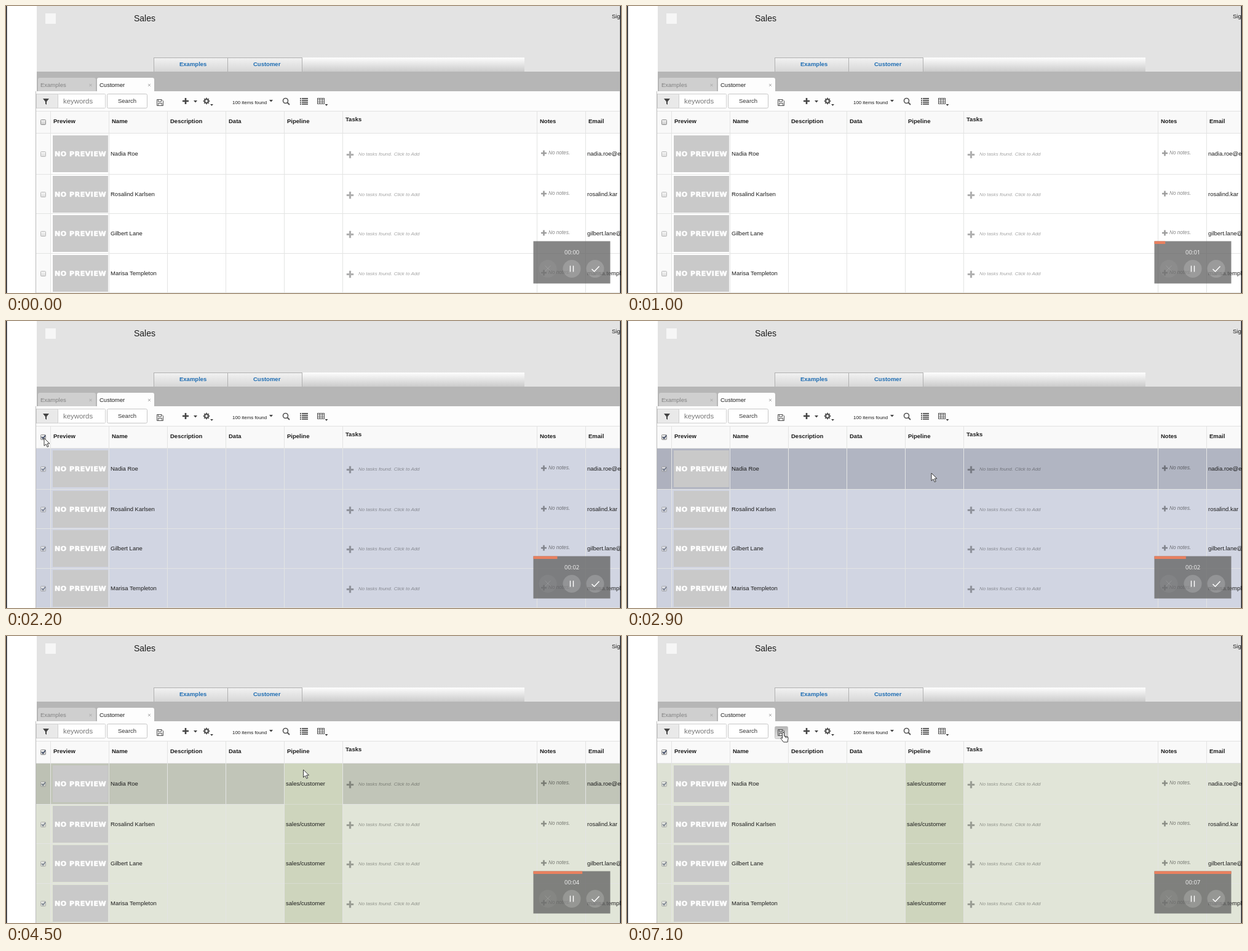
An HTML page for the animation above (7200 ms loop, 1000x468 px).

```html
<!DOCTYPE html>
<html lang="en">
<head>
<meta charset="utf-8">
<title>Customer table</title>
<style>
html, body { margin: 0; width: 100%; height: 100%; overflow: hidden; background: #fff; }
svg { display: block; width: 100%; height: 100%; font: 9.5px "Liberation Sans", Arial, sans-serif; fill: #1c1c1c; }
.bold { font-weight: bold; }
.small { font-size: 7.9px; }
.hint { font-size: 7.9px; font-style: italic; fill: #000; fill-opacity: .36; }
.none { font: bold 11px "DejaVu Sans", sans-serif; letter-spacing: .55px; fill: #fff; stroke: #fff; stroke-width: .6; }
.time { font: 9.5px "Open Sans", sans-serif; fill: #f4f4f4; }
.line { fill: none; stroke: #555; }
</style>
</head>
<body>
<svg id="stage" viewBox="0 0 1000 468" preserveAspectRatio="none"></svg>
<script>
const LOOP = 7200;
const TOPS = [208, 275, 339, 404, 468];
const MIDS = [241, 307, 371, 436];
const COLS = [72, 167, 262, 357, 452, 547, 863, 942];
const RULE = "#e3e4e3";
const PEOPLE = [
  ["Nadia Roe", "nadia.roe@ex"],
  ["Rosalind Karlsen", "rosalind.kar"],
  ["Gilbert Lane", "gilbert.lane@"],
  ["Marisa Templeton", "marisa.temple"]
];
const HEADS = [[77, "Preview"], [172, "Name"], [267, "Description"], [362, "Data"],
  [457, "Pipeline"], [552, "Tasks"], [868, "Notes"], [947, "Email"]];
// Pointer stops: time, x, y
const PATH = [[1100, 998, 330], [1700, 62, 191], [2250, 62, 191], [2400, 66, 209],
  [2900, 495, 248], [3500, 495, 248], [3800, 487, 231], [4300, 487, 231],
  [4700, 480, 205], [4900, 470, 200], [5600, 254, 157], [LOOP, 254, 157]];
const CHECK = 1800, OPEN = 3400, PICK = 3700, APPLY = 4300, SAVE = 5600;

const rect = (x, y, w, h, fill, more = "") =>
  `<rect x="${x}" y="${y}" width="${w}" height="${h}" fill="${fill}" ${more}/>`;
const box = (x, y, w, h, fill, stroke, more = "") =>
  rect(x + .5, y + .5, w - 1, h - 1, fill, `stroke="${stroke}" ${more}`);
const text = (x, y, s, more = "") => `<text x="${x}" y="${y}" ${more}>${s}</text>`;
const path = (d, more = "") => `<path d="${d}" ${more}/>`;
const caret = (x, y, r = 3) => path(`M${x - r} ${y}h${2 * r}l${-r} ${r * 1.2}z`, 'fill="#444"');
const plus = (x, y, r, w, color) =>
  path(`M${x - r} ${y}h${2 * r}M${x} ${y - r}v${2 * r}`, `fill="none" stroke="${color}" stroke-width="${w}"`);
const cross = (x, y, r, color) =>
  path(`M${x - r} ${y - r}l${2 * r} ${2 * r}m0 ${-2 * r}l${-2 * r} ${2 * r}`, `fill="none" stroke="${color}"`);
const grad = (id, a, b) => `<linearGradient id="${id}" x2="0" y2="1">
  <stop stop-color="${a}"/><stop offset="1" stop-color="${b}"/></linearGradient>`;
const checkbox = (y, dim) => `<g opacity="${dim}">` +
  box(56, y - 4, 9, 9, "url(#button)", "#8e8e8e", 'rx="1"') +
  path(`M58 ${y}l2.2 2.4 3.8-5`, 'class="tick" fill="none" stroke="#34405c" stroke-width="1.6"') + "</g>";

function header() {
  return rect(50, 0, 948, 107, "#e3e3e3") +
    rect(64, 12, 17, 17, "#f6f6f6") +
    text(208, 24.5, "Sales", 'font-size="14"') + text(985, 20, "Sig") +
    rect(482, 84, 361, 23, "url(#fade)") +
    [[241, "Examples", 282], [361, "Customer", 402]].map(([x, s, tx]) =>
      box(x - 1, 84, 122, 24, "url(#nav)", "#b0b0b0") +
      text(tx, 98, s, 'class="bold" style="fill:#1e6db3"')).join("") +
    rect(50, 107, 948, 32, "#b6b6b6") +
    path("M52 139v-19q0-3 3-3h88q3 0 3 3v19z", 'fill="#cfcfcf"') +
    path("M148 139v-19q0-3 3-3h87q3 0 3 3v19z", 'fill="#fdfdfd"') +
    text(56, 131.5, "Examples", 'style="fill:#828282"') + text(152, 131.5, "Customer") +
    cross(137.5, 129, 2, "#aaa") + cross(233, 129, 2, "#aaa");
}

function toolbar() {
  const teeth = [...Array(8)].map((_, i) =>
    `<rect x="325" y="149.7" width="2" height="3" transform="rotate(${i * 45} 326 155)" fill="#555"/>`).join("");
  const list = [0, 1, 2, 3].map(i =>
    rect(478, 150 + i * 3, 2, 1.7, "#444") + rect(481, 150 + i * 3, 10, 1.7, "#444")).join("");
  return rect(48, 139, 950, 33, "#fdfdfd") +
    box(49, 143, 36, 24, "#e9e9e9", "#cfcfcf") + path("M60 151h10l-4 5v5l-2-1.6v-3.4z", 'fill="#444"') +
    box(84, 143, 78, 24, "#fff", "#cfcfcf", 'rx="1"') +
    text(93, 159, "keywords", 'font-size="11.4" style="fill:#777"') +
    box(164, 143, 66, 24, "#fff", "#c6c6c6", 'rx="2"') + text(182, 158, "Search", 'style="fill:#333"') +
    '<g id="save">' + box(240, 147, 22, 21, "url(#press)", "#c4c4c4", 'rx="2"') + "</g>" +
    path("M245.5 152.5h7.5l2.5 2.5v7.5h-10zM247.5 152.5v3.5h5v-3.5M247.5 162v-3.5h6v3.5", 'class="line"') +
    plus(292, 155, 5, 2.6, "#444") + caret(308, 154) +
    teeth + '<circle cx="326" cy="155" r="2.9" class="line" stroke-width="2"/>' + caret(334.5, 160, 2.4) +
    text(368, 159.5, "100 items found", 'class="small"') + caret(431, 153) +
    '<circle cx="454.5" cy="154.5" r="4" class="line" stroke-width="1.6"/>' +
    path("M457.5 157.5l3.5 3.5", 'class="line" stroke-width="2"') + list +
    box(506, 150, 12, 10, "#fff", "#555") +
    path("M506 153h12M506 156.5h12M510.2 150v10M514.2 150v10", 'class="line"') + caret(521, 160, 2.4);
}

function row([name, mail], i) {
  const y = MIDS[i], top = TOPS[i], h = TOPS[i + 1] - top;
  return rect(49, top, 949, h, "#fff", 'class="row"') +
    rect(49, top, 23, h, "rgba(0,0,0,.02)") +
    rect(49, top + h - 1, 949, 1, RULE) +
    rect(453, top, 94, h - .5, "#ced5bd", 'class="cell"') +
    checkbox(y, .6) +
    rect(76, y - 30, 90, 60, "#c9c9c9") + text(79, y + 4, "NO PREVIEW", 'class="none"') +
    text(170, y + 3, name) + text(455, y + 3, "sales/customer", 'class="cell"') +
    plus(559.5, y + 1.5, 5.7, 3.2, "rgba(0,0,0,.31)") +
    text(573, y + 3, "No tasks found. &#8202;Click to Add", 'class="hint"') +
    plus(874.5, y - 1, 4.5, 2.6, "rgba(0,0,0,.38)") +
    text(882, y + 1, "No notes.", 'class="hint" style="font-size:8.2px;fill-opacity:.48"') +
    text(945, y + 3, mail);
}

function table() {
  return rect(49, 171, 949, 37, "#f9f9f9") + rect(49, 171, 949, 1, "#e2e2e2") +
    PEOPLE.map(row).join("") + rect(49, 207, 949, 1, "#e2e2e2") +
    COLS.map(x => rect(x, 172, 1, 296, RULE)).join("") +
    rect(48, 139, 1, 329, "#bcbcbc") + checkbox(189, 1) +
    HEADS.map(([x, s]) => text(x, s == "Tasks" ? 187.5 : 191, s, 'class="bold"')).join("");
}

function menu() {
  return '<g id="menu">' + rect(452, 209, 98, 33, "rgba(0,0,0,.15)") +
    box(452, 208, 97, 32, "#fff", "#c4c4c4") + rect(536, 209, 12, 30, "#f1f1f1") +
    path("M539.5 217h5l-2.5-3zM539.5 232h5l-2.5 3z", 'fill="#999"') + text(462, 221, "---") +
    '<g id="pick">' + rect(460, 224, 67, 12, "#1e8df2") + "</g>" +
    text(462, 233, "sales/customer", 'id="option"') + "</g>";
}

function recorder() {
  const round = (x, a) => `<circle cx="${x}" cy="428.5" r="14.5" fill="#fff" fill-opacity="${a}"/>`;
  return rect(857.5, 383.5, 125, 69, "rgba(100,100,100,.78)") +
    rect(857.5, 383.5, 0, 4.5, "#e9805f", 'id="bar"') + text(908, 405, "", 'id="clock" class="time"') +
    round(881, .05) + cross(881, 428, 4.5, "rgba(255,255,255,.14)") + round(920, .18) + round(958, .18) +
    path("M917.5 423.5v10M922.5 423.5v10", 'fill="none" stroke="#fff" stroke-width="1.4"') +
    path("M952.5 429l4 4 8-8.5", 'fill="none" stroke="#fff" stroke-width="1.5"');
}

const pointers =
  path("M0 0v12.5l3-2.7 2.2 4.7 2-1-2.2-4.5h4z", 'id="arrow" fill="#fff" stroke="#222" stroke-width=".9"') +
  path("M-1.5 1.2q1.5-2 3 0v5l5.5 1.2q1.4.5 1.2 2.2l-1.2 6.4h-6.4l-4.4-5.6q-.3-1.8 1.4-1.2l.9.8zM3.7 6.8v2.5M6 7.3v2.3",
    'id="hand" fill="#fff" stroke="#222" stroke-width=".9"');

const stage = document.getElementById("stage");
stage.innerHTML = "<defs>" + grad("nav", "#f2f2f2", "#d6d6d6") + grad("fade", "#fefefe", "#cbcbcb") +
  grad("button", "#f4f4f4", "#c9c9c9") + grad("press", "#b4b4b4", "#e2e2e2") + "</defs>" +
  rect(0, 0, 1000, 468, "#fff") + header() + toolbar() + table() + menu() + recorder() + pointers +
  rect(0, 0, 1.5, 468, "#15151a") + rect(998.5, 0, 1.5, 468, "#15151a");

const el = id => document.getElementById(id);
const show = (node, on) => node.style.display = on ? "" : "none";
const rows = [...document.querySelectorAll(".row")];
const cells = [...document.querySelectorAll(".cell")];
const ticks = [...document.querySelectorAll(".tick")];

function pointerAt(t) {
  const i = PATH.findIndex(p => p[0] > t);
  if (i < 1) return null;
  const [t0, x0, y0] = PATH[i - 1], [t1, x1, y1] = PATH[i];
  const u = (t - t0) / (t1 - t0), k = u * u * (3 - 2 * u);
  return [x0 + (x1 - x0) * k, y0 + (y1 - y0) * k];
}

function draw(t) {
  const at = pointerAt(t), open = t >= OPEN && t < APPLY, saving = t >= SAVE;
  const base = t < CHECK ? [255, 255, 255] : t < APPLY ? [209, 213, 226] : [225, 229, 216];
  rows.forEach((r, i) => {
    const over = at && !open && at[1] >= TOPS[i] && at[1] < TOPS[i + 1];
    r.setAttribute("fill", `rgb(${base.map(c => over ? c - 32 : c)})`);
  });
  cells.forEach(c => show(c, t >= APPLY));
  ticks.forEach(c => show(c, t >= CHECK));
  show(el("menu"), open);
  show(el("pick"), t >= PICK);
  el("option").style.fill = t >= PICK ? "#fff" : "";
  show(el("save"), saving);
  show(el("arrow"), at && !saving);
  show(el("hand"), saving);
  if (at) for (const id of ["arrow", "hand"]) el(id).setAttribute("transform", `translate(${at})`);
  el("bar").setAttribute("width", Math.min(125, t * .0177));
  el("clock").textContent = "00:0" + Math.floor(t / 1000);
}

const start = performance.now();
function tick(now) {
  const t = Math.max(0, now - start) % LOOP;
  draw(Math.floor(t / 100) * 100);
  requestAnimationFrame(tick);
}
draw(0);
requestAnimationFrame(tick);
</script>
</body>
</html>
```
